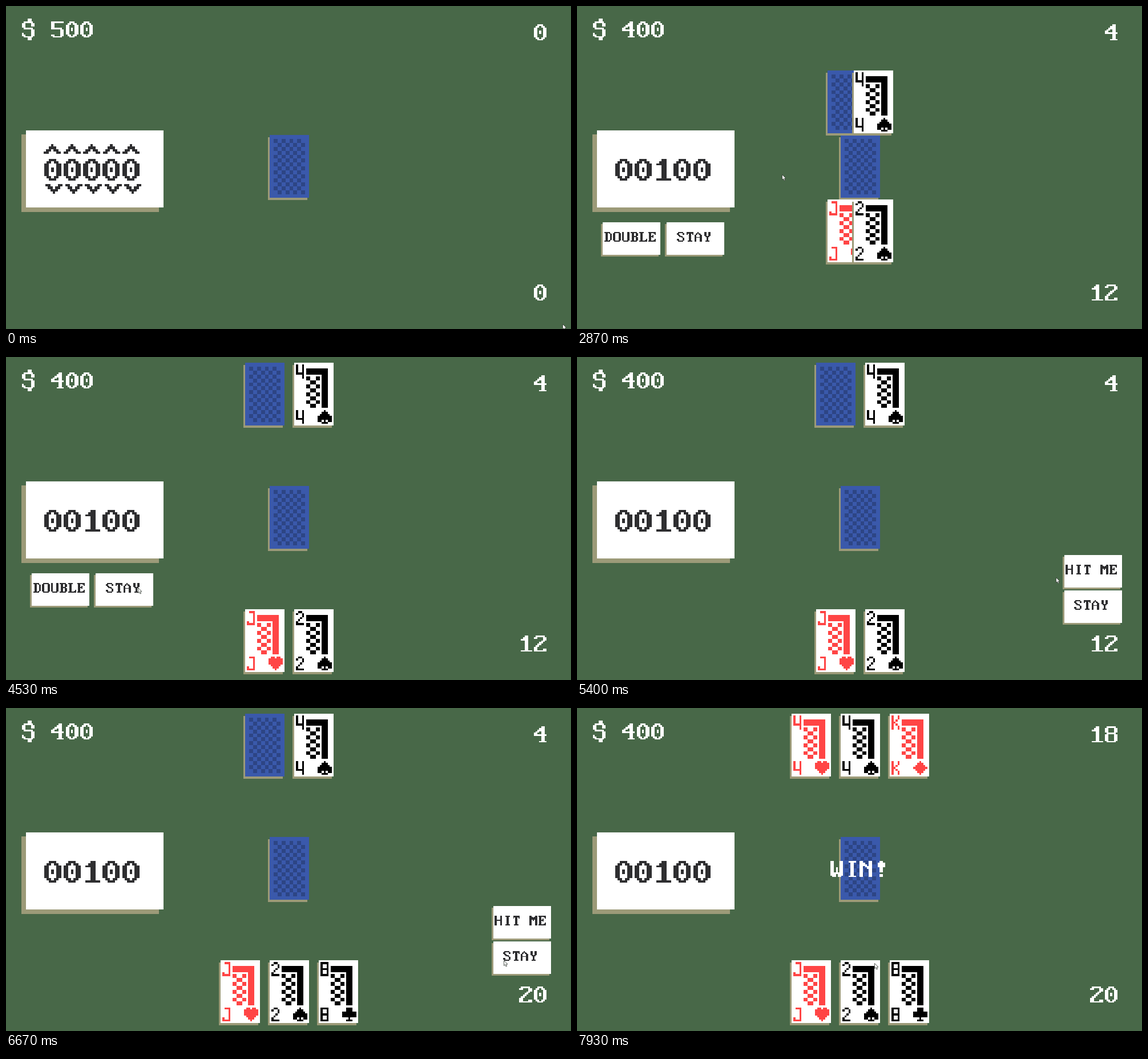
These frames come from a looping animation (990x566 px, 8000 ms). An HTML page with a canvas:

```html
<!DOCTYPE html>
<html lang="en">
<head>
<meta charset="utf-8">
<title>Blackjack</title>
<style>
html, body { margin: 0; width: 100%; height: 100%; overflow: hidden; background: #486848; }
canvas { display: block; }
</style>
</head>
<body>
<canvas id="stage" width="990" height="566" role="img" aria-label="Blackjack table: bet 100, hit, stay, win"></canvas>
<script>
const ctx = document.getElementById('stage').getContext('2d');
const LOOP = 8000;
const TABLE = '#486848', SHADE = '#9c9a78', WHITE = '#ffffff', INK = '#2e2e30';
const BLUE = '#3a59ab', NAVY = '#2d4585', RED = '#ff4545', BLACK = '#000000';

// Pen strokes on an 8 x 10 cell, points written as xy pairs.
// The pen is two cells wide; a leading dot selects the one-cell pen.
const LETTERS = {
  '0': '20110207182939485752413020 .3435',
  '1': '123039 1959',
  '2': '01104051520709 095958',
  '4': '40040555 4049 3959',
  '5': '50000444555849 491908',
  '8': '104051534414030110 1405081949585544',
  '$': '524010010314445558491908 .62 .07',
  'A': '.30 210309 315359 0555',
  'B': '004051534414 1019 4455584909',
  'D': '003052573909 1019',
  'E': '005051 .62 1019 .4345 1434 .67 585909',
  'H': '0009 5059 0454',
  'I': '2040 3039 2949',
  'L': '0020 1019 .67 585909',
  'M': '0009 5059 0022 5032 1343 .34',
  'N': '0009 5059 0055',
  'O': '104051584919080110',
  'S': '525140100102132434565849190807',
  'T': '1050 1151 .12 .62 3039 2949',
  'U': '000819495850',
  'W': '000819 505849 .28 .48 0757 .3436',
  'Y': '10132439 505344 3539 2949',
  '!': '3036 2123 4143 3839'
};
LETTERS.Y = '10132435 35 39 50534435 3539 2949';

const RANKS = {
  '2': '.0110203132050636',
  '4': '.000434 .3036',
  '8': '.0030360600 .0333',
  'J': '.1030360605',
  'K': '.0006 .3031133536'
};

// Row widths of each centred suit, and cells cut out of it.
const SUITS = {
  heart: ['7777531', '003060'],
  spade: ['1357773', '2545'],
  club: ['3377713', ''],
  diamond: ['1357531', '']
};

function rect(x, y, w, h, color) {
  const l = Math.round(x), t = Math.round(y);
  ctx.fillStyle = color;
  ctx.fillRect(l, t, Math.round(x + w) - l, Math.round(y + h) - t);
}

const pairs = s => (s.match(/../g) || []).map(p => [+p[0], +p[1]]);

function strokes(glyph, x, y, w, h, color) {
  for (const part of glyph.split(' ')) {
    const thin = part[0] === '.';
    const pts = pairs(thin ? part.slice(1) : part);
    pts.forEach(([bx, by], i) => {
      const [ax, ay] = pts[Math.max(0, i - 1)];
      const n = Math.max(Math.abs(bx - ax), Math.abs(by - ay), 1);
      for (let k = 0; k <= n; k++) {
        const px = Math.round(ax + (bx - ax) * k / n);
        const py = Math.round(ay + (by - ay) * k / n);
        rect(x + px * w, y + py * h, thin ? w : 2 * w, h, color);
      }
    });
  }
}

function text(str, x, y, step, color) {
  const w = step / 8, h = step / 9;
  [...str].forEach((c, i) => {
    if (LETTERS[c]) strokes(LETTERS[c], x + i * step, y, w, h, color);
  });
}

const U = 3.45;

function cardBase(x, y, color) {
  rect(x - 3, y + 4, 69, 110, SHADE);
  rect(x, y, 69, 110, color);
}

function cardBack(x, y) {
  cardBase(x, y, BLUE);
  for (let r = 0; r < 14; r++)
    for (let c = r % 2; c < 8; c += 2)
      rect(x + (2 + 2 * c) * U, y + (2 + 2 * r) * U, 2 * U, 2 * U, NAVY);
}

function cardFront(x, y, rank, suit) {
  const color = suit === 'heart' || suit === 'diamond' ? RED : BLACK;
  const cell = (c, r, w, h, fill = color) => rect(x + c * U, y + r * U, w * U, h * U, fill);
  cardBase(x, y, WHITE);
  for (const r of [1, 24])
    strokes(RANKS[rank], x + U, y + r * U, U, U, color);
  cell(6, 3, 11, 3);
  cell(14, 3, 3, 20);
  for (let r = 0; r < 8; r++) {
    if (r % 2) {
      cell(8, 7 + 2 * r, 3, 2);
    } else {
      cell(6, 7 + 2 * r, 2, 2);
      cell(11, 7 + 2 * r, 2, 2);
    }
  }
  const [rows, holes] = SUITS[suit];
  [...rows].forEach((n, r) => cell(12 + (7 - n) / 2, 24 + r, +n, 1));
  for (const [c, r] of pairs(holes)) cell(12 + c, 24 + r, 1, 1, WHITE);
}

function button(label, x, y, tx, pressed) {
  rect(x - 3, y + 3, 101, 57, SHADE);
  rect(x, y, 101, 57, pressed ? '#f4f4f4' : WHITE);
  text(label, tx, y + 17, 15.3, INK);
}

// Times in ms: tween starts, and the moments the table changes.
const DEAL = 2840, HIT = 5833, DRAW = 6955;
const RAISE_AT = 1870, BET_AT = 2870, STAND_AT = 4730, HIT_AT = 5870, REVEAL_AT = 6730, DRAW_AT = 6990;
const DECK = [462, 226];

const mix = (a, b, k) => a + (b - a) * k;
const settle = (t, start) => t < start ? 0 : 1 - Math.exp((start - t) / 42);
const slot = (i, n) => DECK[0] + 86.3 * (i - (n - 1) / 2);

function hand(t, y, third, shown, cards) {
  cards.forEach(([rank, suit, hidden], i) => {
    if (i === 2 && t < shown) return;
    const k = settle(t, i === 2 ? third : DEAL);
    const goal = i === 2 ? slot(2, 3) : mix(slot(i, 2), slot(i, 3), t < shown ? 0 : settle(t, third));
    const px = Math.round(mix(DECK[0], goal, k));
    const py = Math.round(mix(DECK[1], y, k));
    if (hidden) cardBack(px, py);
    else cardFront(px, py, rank, suit);
  });
}

// Pointer path: time, x, y.
const PATH = [
  [0, 975, 557], [70, 968, 550], [300, 640, 390], [560, 235, 219], [730, 194, 236],
  [1070, 194, 236], [1330, 163, 251], [1470, 162, 251], [1530, 155, 251],
  [1870, 155, 251], [2400, 345, 291], [2820, 345, 291], [3070, 473, 332], [3600, 232, 392],
  [3760, 232, 392], [4070, 118, 402], [4360, 118, 402], [4530, 231, 404],
  [4700, 231, 404], [5530, 881, 385], [5600, 881, 385], [5730, 886, 374],
  [5960, 886, 374], [6670, 872, 442], [6760, 872, 442], [7070, 864, 440],
  [7530, 522, 447], [7900, 522, 447], [7930, 521, 447], [LOOP, 521, 447]
];

function pointer(t) {
  const i = PATH.findIndex(p => p[0] > t);
  const [ta, xa, ya] = PATH[i - 1], [tb, xb, yb] = PATH[i];
  let k = (t - ta) / (tb - ta);
  k = k * k * (3 - 2 * k);
  ctx.save();
  ctx.translate(Math.round(mix(xa, xb, k)), Math.round(mix(ya, yb, k)));
  ctx.beginPath();
  ctx.moveTo(0.5, 0.5);
  for (const [x, y] of [[0.5, 9.5], [2.6, 7.6], [4, 11], [5.6, 10.3], [4.3, 7.1], [7, 7]])
    ctx.lineTo(x, y);
  ctx.closePath();
  ctx.fillStyle = WHITE;
  ctx.fill();
  ctx.strokeStyle = '#303830';
  ctx.lineWidth = 0.8;
  ctx.stroke();
  ctx.restore();
}

function score(value, y) {
  const s = String(value);
  text(s, 950.3 - 25.5 * s.length, y, 25.5, WHITE);
}

function betPanel(t) {
  rect(27, 225, 241, 136, SHADE);
  rect(35, 218, 241, 135, WHITE);
  text(t < RAISE_AT ? '00000' : '00100', 66.5, 268, 34.3, INK);
  if (t >= BET_AT) return;
  const p = 4.3;
  for (let i = 0; i < 5; i++) {
    const x = 66 + i * 34.5;
    for (let r = 0; r < 4; r++) {
      for (const c of [3 - r, Math.max(3, 2 + r)]) {
        const w = r ? 2 * p : p;
        rect(x + c * p, 242 + r * p, w, p, INK);
        rect(x + 3 + c * p, 312 + (3 - r) * p, w, p, INK);
      }
    }
  }
}

function draw(t) {
  rect(0, 0, 990, 566, TABLE);

  text(t < BET_AT ? '$ 500' : '$ 400', 28, 27, 25.5, WHITE);
  for (const y of [22, 55]) rect(37.5, y, 7, 5, WHITE);

  const dealt = t >= BET_AT;
  score(!dealt ? 0 : t < REVEAL_AT ? 4 : t < DRAW_AT ? 8 : 18, 32);
  score(!dealt ? 0 : t < HIT_AT ? 12 : 20, 488);

  betPanel(t);
  cardBack(...DECK);

  if (t >= RAISE_AT && !dealt) button('BET', 298, 259, 324);
  if (dealt && t < STAND_AT) {
    button('DOUBLE', 45, 379, 48);
    button('STAY', 157, 379, 175);
  }
  if (t >= STAND_AT && t < REVEAL_AT) {
    button('HIT ME', 853.5, 347, 856, t >= HIT_AT && t < 6000);
    button('STAY', 853.5, 409, 871);
  }
  if (dealt) {
    hand(t, 10, DRAW, DRAW_AT, [['4', 'heart', t < REVEAL_AT], ['4', 'spade'], ['K', 'diamond']]);
    hand(t, 442, HIT, HIT_AT, [['J', 'heart'], ['2', 'spade'], ['8', 'club']]);
  }
  if (t >= DRAW_AT) text('WIN!', 444, 268, 25.5, WHITE);
  pointer(t);
}

const start = performance.now();
function tick() {
  draw((performance.now() - start) % LOOP);
  requestAnimationFrame(tick);
}
tick();
</script>
</body>
</html>
```
